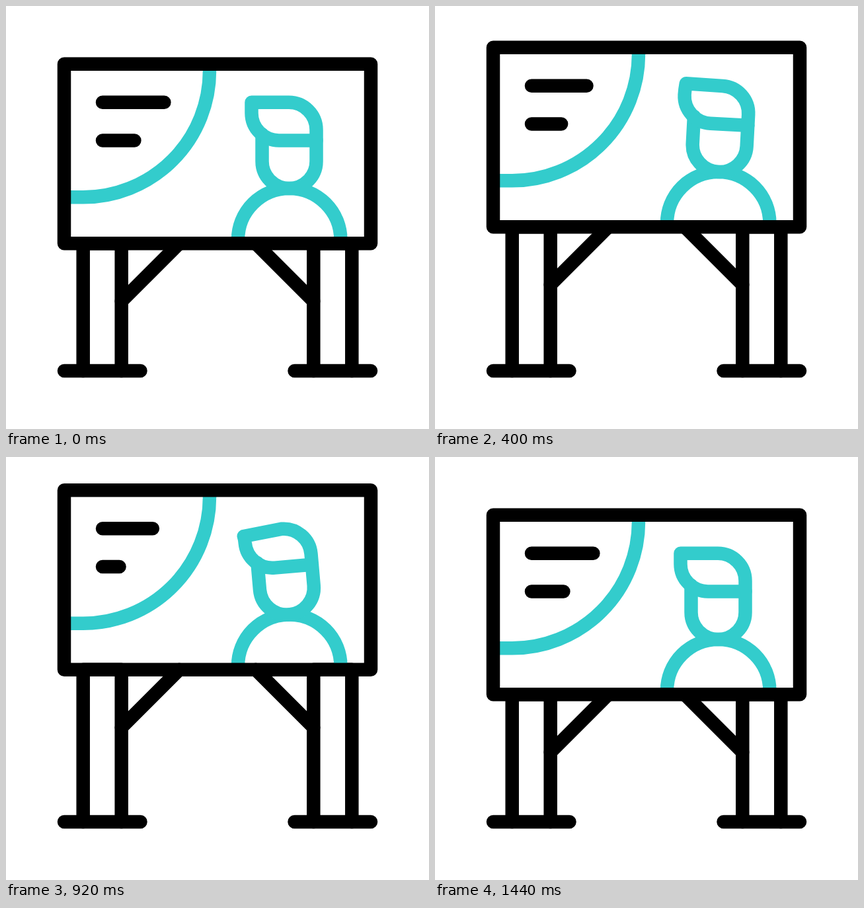
Animation, 640 px wide and 640 px high, one loop 1600 ms. Source, as an HTML page:

```html
<!DOCTYPE html>
<html lang="en">
<head>
<meta charset="utf-8">
<title>Billboard</title>
<style>
  html, body { margin: 0; width: 100%; height: 100%; overflow: hidden; background: #fff; }
  svg { display: block; width: 100vw; height: 100vh; }
  path { fill: none; stroke: #000; stroke-width: 20.5; stroke-linecap: round; stroke-linejoin: round; }
  .teal path { stroke: #33cccc; }
  .teal .flat { stroke-linecap: butt; }
</style>
</head>
<body>
<svg viewBox="0 0 640 640">
  <path d="M88 552H203.5M436.5 552H552"/>
  <path id="legs"/>
  <g id="board">
    <g class="teal">
      <path class="flat" d="M308 90V98A191.3 191.3 0 0 1 116.7 289.3H90"/>
      <path class="flat" d="M351 358V353.7A77.7 77.7 0 0 1 506.4 353.7V358"/>
      <g id="head">
        <path d="M387.5 194V235A41 41 0 0 0 469.5 235V203.5"/>
        <path id="hair"/>
      </g>
    </g>
    <path d="M88 87.8H552V359.3H88Z"/>
    <path d="M262.2 359.3L174.7 446.8M377.8 359.3L465.3 446.8"/>
    <path id="text"/>
  </g>
</svg>
<script>
const LOOP = 1600, STEP = 40;
const el = id => document.getElementById(id);
const legs = el('legs'), board = el('board'), head = el('head'), hair = el('hair'), text = el('text');

// Symmetric cubic ease (.45, 0, .55, 1)
function ease(x) {
  if (x <= 0) return 0;
  if (x >= 1) return 1;
  let lo = 0, hi = 1, u = x;
  for (let i = 0; i < 22; i++) {
    u = (lo + hi) / 2;
    const v = 1 - u;
    const at = 3 * u * v * v * 0.45 + 3 * u * u * v * 0.55 + u * u * u;
    if (at < x) lo = u; else hi = u;
  }
  return u * u * (3 - 2 * u);
}

// Eased value through [time, value] keys
function track(t, keys) {
  let value = keys[0][1];
  for (let i = 1; i < keys.length; i++) {
    const [t0, v0] = keys[i - 1], [t1, v1] = keys[i];
    if (t >= t0) value = v0 + (v1 - v0) * ease((t - t0) / (t1 - t0));
  }
  return value;
}

const swing = (t, from, peak, to, size) => track(t, [[from, 0], [peak, size], [to, 0]]);

function draw(t) {
  const lift = swing(t, 40, 720, 1400, 45.2);
  const top = 359.3 - lift;
  board.setAttribute('transform', `translate(0 ${-lift})`);
  legs.setAttribute('d', `M116.7 552V${top}H174.7V552M465.3 552V${top}H523.3V552`);

  const long = 239.4 - swing(t, 120, 720, 1320, 22.5);
  const short = 194.4 - swing(t, 240, 840, 1440, 23.6);
  text.setAttribute('d', `M146 145.8H${long}M146 203.6H${short}`);

  const tilt = track(t, [[220, 0], [640, 8.1], [940, -5.1], [1270, 0]]);
  head.setAttribute('transform', `rotate(${tilt} 428.5 277)`);

  const x = 371.5 + track(t, [[300, 0], [660, 8.5], [960, -1.5], [1280, 0]]);
  const y = 145.8 + track(t, [[300, 0], [660, -5.3], [960, 6.5], [1280, 0]]);
  hair.setAttribute('d', `M${x} ${y}L428 145.8A41.5 41.5 0 0 1 469.5 187.3V203.5H413` +
    `A41.5 41.5 0 0 1 371.5 162Q371.5 155 ${x} ${y}Z`);
}

function tick() {
  const t = performance.now() % LOOP;
  draw(Math.floor(t / STEP) * STEP);
  requestAnimationFrame(tick);
}
tick();
</script>
</body>
</html>
```
